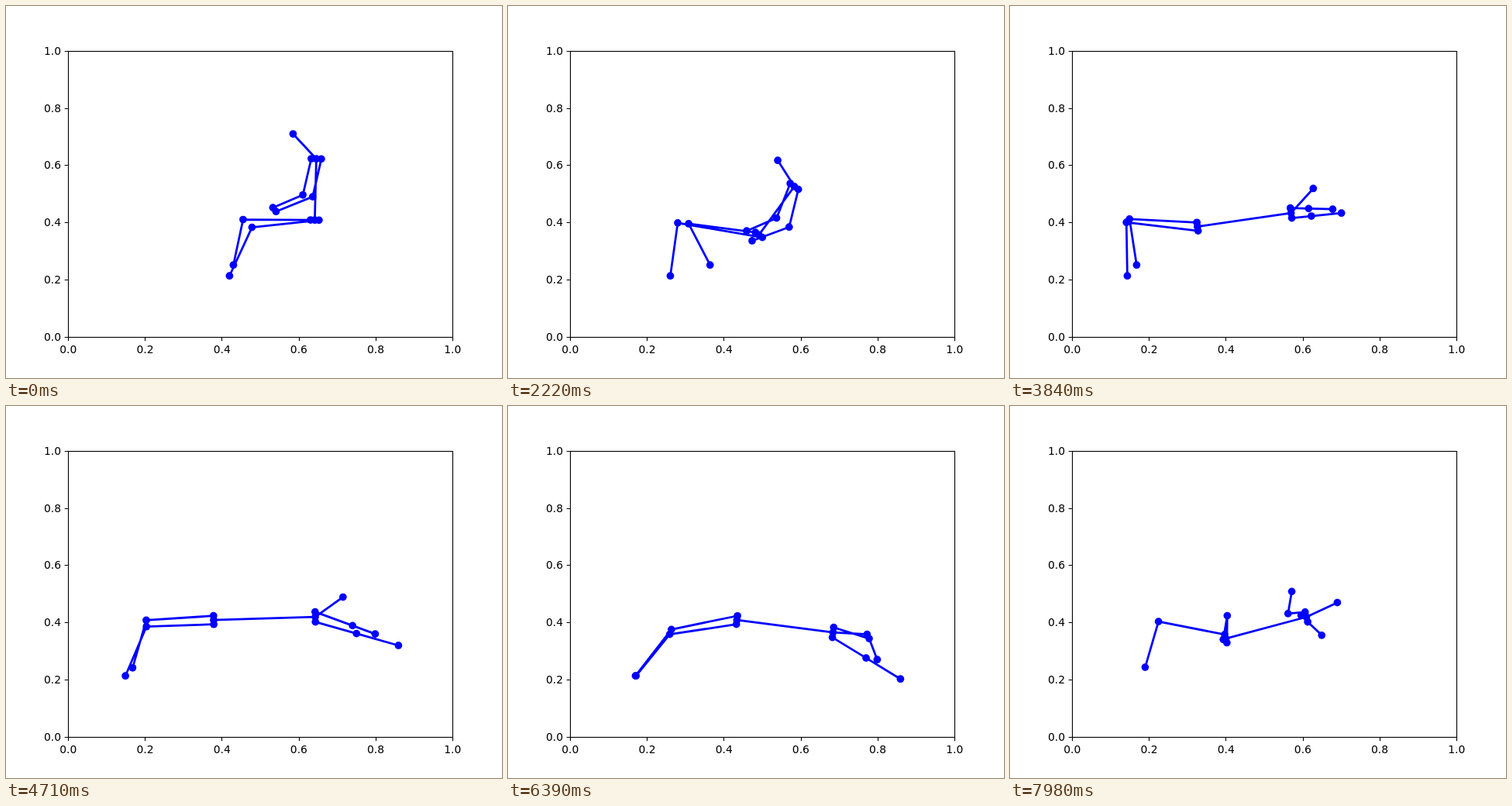
An HTML page for the animation above (8 s loop, 640 by 480 pixels).

```html
<!DOCTYPE html>
<html lang="en">
<head>
<meta charset="utf-8">
<title>Stick figure plot</title>
<style>
  html, body { margin: 0; width: 100%; height: 100%; overflow: hidden; background: #fff; }
  svg { display: block; width: 640px; height: 480px; }
  text { font: 13.89px "DejaVu Sans", sans-serif; }
</style>
</head>
<body>
<svg viewBox="0 0 640 480">
  <g id="axes" fill="none" stroke="#000" stroke-width="1.11">
    <rect x="80.5" y="58.5" width="496" height="369"/>
  </g>
  <g id="labels"></g>
  <g transform="translate(.4 .2)">
    <path id="bones" fill="none" stroke="#00f" stroke-width="2.78" stroke-linejoin="round" stroke-linecap="square"/>
    <g id="dots" fill="#00f"></g>
  </g>
</svg>
<script>
const LOOP = 8000, STEP = 30;
const $ = id => document.getElementById(id);

function add(parent, tag, attrs, text) {
  const el = document.createElementNS('http://www.w3.org/2000/svg', tag);
  for (const k in attrs) el.setAttribute(k, attrs[k]);
  if (text) el.textContent = text;
  return parent.appendChild(el);
}

for (let i = 0; i <= 5; i++) {
  const label = (i / 5).toFixed(1);
  const x = 80 + 99.2 * i, y = Math.round(427.2 - 73.92 * i);
  add($('axes'), 'path', { d: `M${Math.round(x) + .5} 427.5v4.86M80.5 ${y + .5}h-4.86` });
  add($('labels'), 'text', { x: x + .3, y: 448, 'text-anchor': 'middle' }, label);
  add($('labels'), 'text', { x: 71, y: y + 5, 'text-anchor': 'end' }, label);
}

// Smooth step from 0 to 1 between two times
function ease(t, from, to) {
  const u = Math.min(1, Math.max(0, (t - from) / (to - from)));
  return u * u * (3 - 2 * u);
}

// Rounded bump of height 1 around a time
function swell(t, mid, reach) {
  const u = Math.min(1, Math.abs(t - mid) / reach);
  return Math.cos(u * Math.PI / 2) ** 2;
}

const polar = (p, r, a) => [p[0] + r * Math.cos(a), p[1] + r * Math.sin(a)];

// Middle joint of a two-bone limb; bones stretch if the end is out of reach
function bend(root, end, upper, lower, side) {
  const dx = end[0] - root[0], dy = end[1] - root[1];
  const dist = Math.hypot(dx, dy) || .01;
  const k = Math.max(1, dist / (upper + lower));
  const a = upper * k, b = lower * k;
  const c = (a * a + dist * dist - b * b) / (2 * a * dist);
  return polar(root, a, Math.atan2(dy, dx) + side * Math.acos(Math.min(1, Math.max(-1, c))));
}

function pose(t) {
  const lean = ease(t, 0, 1500), reach = ease(t, 1500, 2910), sink = ease(t, 0, 2910);
  const lift = ease(t, 2910, 3840), plant = ease(t, 3840, 5600), settle = ease(t, 3840, 7170);
  const rise = ease(t, 7150, LOOP);

  // Trunk
  const neck = [
    400 - 45 * ease(t, 900, 3000) + 64 * ease(t, 3400, 5500) - 37 * rise,
    197 + 70 * ease(t, 500, 3900) + 29 * settle - 24 * rise
  ];
  const pelvis = [
    398 - 157 * ease(t, 600, 3950) + 54 * plant - 17 * rise,
    276 + 26 * swell(t, 2800, 1700) + 24 * rise
  ];
  const nod = -133 + 88 * ease(t, 1700, 4100) + 56 * settle - 36 * rise;
  const head = polar(neck, 44 - 11 * swell(t, 2910, 1200), nod * Math.PI / 180);

  // Shoulders and hips lie across the spine
  const across = Math.atan2(pelvis[1] - neck[1], pelvis[0] - neck[0]) - Math.PI / 2;
  const shoulderL = polar(neck, -6.5, across), shoulderR = polar(neck, 6.5, across);
  const hipL = polar(pelvis, -5.5, across), hipR = polar(pelvis, 5.5, across);

  // Hands and feet
  const wristL = [
    344 + 11 * lean - 92 * reach + 213 * ease(t, 2800, 4400) - 113 * rise,
    260 + 35 * sink - 33 * lift + 65 * plant - 88 * rise
  ];
  const wristR = [
    348 + 13 * lean - 90 * reach + 235 * ease(t, 2800, 4500) - 131 * rise,
    265 + 44 * sink - 42 * lift + 85 * plant - 82 * rise
  ];
  const ankleL = [
    293 - 130 * ease(t, 1500, 3700) + 11 * ease(t, 6000, LOOP),
    334 + 14 * swell(t, 6300, 2400)
  ];
  const ankleR = [
    288 - 57 * ease(t, 810, 1600) - 80 * ease(t, 1600, 3400) + 16 * settle + 108 * rise,
    348 - 47 * rise
  ];

  // Limbs shorten where they point towards the viewer
  const turn = swell(t, 3840, 900) + swell(t, LOOP, 750);
  const fold = swell(t, LOOP, 700);
  const elbowL = bend(shoulderL, wristL, 48 * (1 - .54 * turn), 42 - 13 * lift, -1);
  const elbowR = bend(shoulderR, wristR, 50 * (1 - .5 * turn), 51 * (1 - .25 * turn), -1);
  const kneeL = bend(hipL, ankleL, 87, 60 + 16 * swell(t, 6200, 2200), 1);
  const kneeR = bend(hipR, ankleR, (87 + 25 * swell(t, 2500, 2000)) * (1 - .6 * fold), 69 * (1 - .55 * fold), 1);

  return [
    [head, neck, pelvis],
    [wristL, elbowL, shoulderL, neck, shoulderR, elbowR, wristR],
    [ankleL, kneeL, hipL, pelvis, hipR, kneeR, ankleR]
  ];
}

const joints = chains => [...new Set(chains.flat())];
const dots = joints(pose(0)).map(() => add($('dots'), 'circle', { r: 4.86 }));

function draw(t) {
  const chains = pose(t);
  $('bones').setAttribute('d', chains.map(c => 'M' + c.map(p => p.join(' ')).join('L')).join(''));
  joints(chains).forEach(([x, y], i) => {
    dots[i].setAttribute('cx', x);
    dots[i].setAttribute('cy', y);
  });
}

const start = performance.now();
function tick(now) {
  const t = Math.max(0, now - start) % LOOP;
  draw(Math.floor(t / STEP) * STEP);
  requestAnimationFrame(tick);
}
draw(0);
requestAnimationFrame(tick);
</script>
</body>
</html>
```
